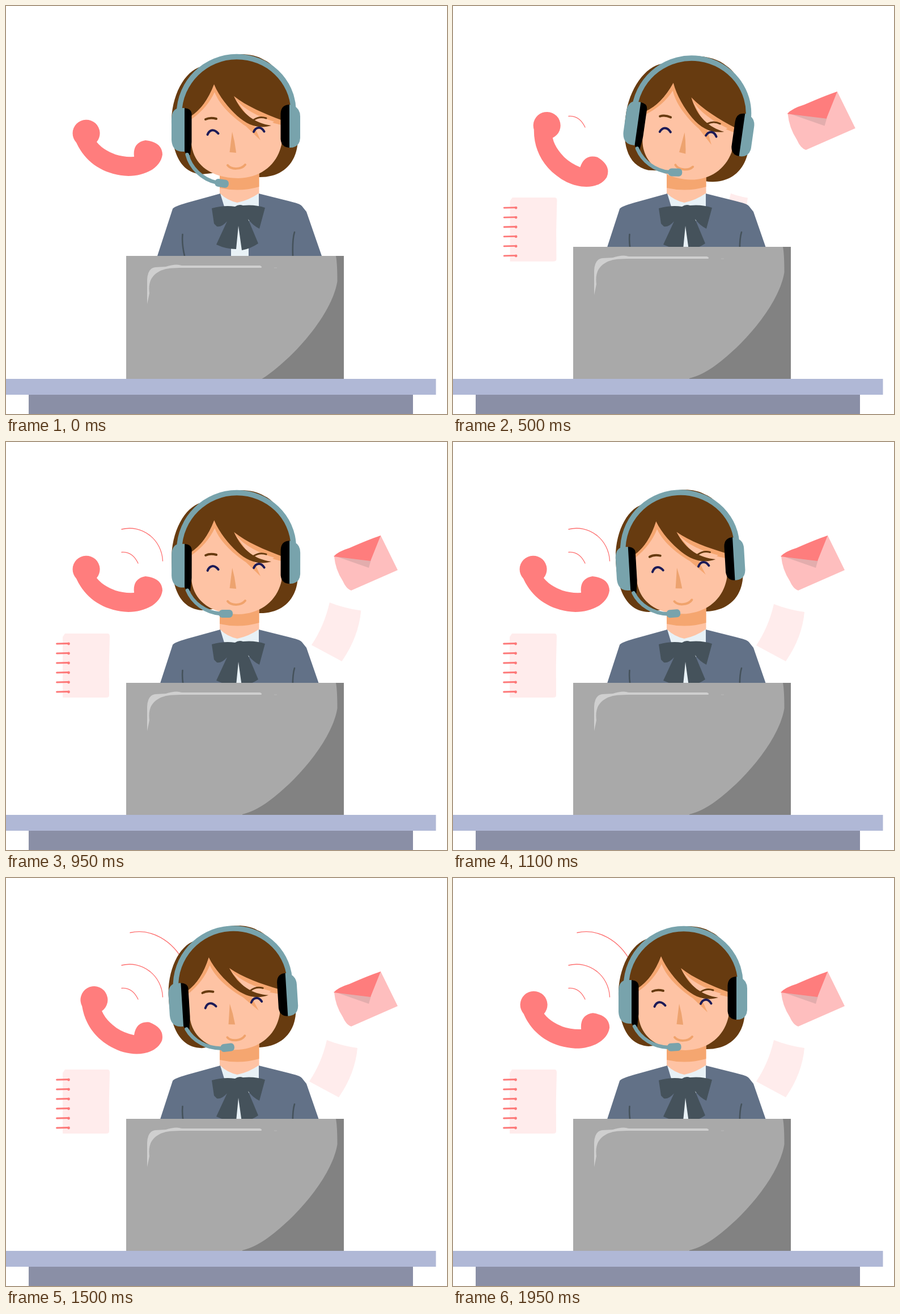
Write an HTML page that moves like this. It is 778 by 720 pixels and loops after 2 s.

```html
<!DOCTYPE html>
<html lang="en">
<head>
<meta charset="utf-8">
<title>Help desk</title>
<style>
html, body { margin: 0; width: 100%; height: 100%; overflow: hidden; background: #fff; }
svg { display: block; width: 100vw; height: 100vh; }
.line { fill: none; stroke-linecap: round; stroke-linejoin: round; }
</style>
</head>
<body>
<svg viewBox="0 0 778 720">
  <g class="line" stroke="#fd7070" stroke-width="1.3">
    <path id="wave1" d="M204 194.500Q223 193 233 214"/>
    <path id="wave2" d="M204 154C240 145 275 172 276.500 210"/>
    <path id="wave3" d="M219 96.500C255 88 294 110 314 149"/>
  </g>

  <path id="phone" fill="#ff7d7d" d="M124 241A24 24 0 1 1 160 240Q171 254 193 262Q208 267 226 266Q223 241 246 237Q275 240 276 262C273 286 245 300 216 300C172 298 140 276 124 241Z"/>

  <g id="notebook">
    <path fill="#ffecec" d="M104 338H179Q183 338 183 343Q181 395 182 447Q182 451 177 451H100V344Z"/>
    <g id="rings" class="line" stroke="#fd7878" stroke-width="2.800"></g>
  </g>

  <path id="sheet" fill="#ffecec" d="M566 286Q592 296 620 300Q616 345 587 387L535 359Q557 326 566 286Z"/>

  <g id="envelope">
    <path fill="#febebe" d="M579 202L661 165L691 226L609 262Q600 259 594 245Q581 225 579 202Z"/>
    <path fill="#e3adad" d="M580 201L644 208L640 222Z"/>
    <path fill="#fe7d7d" d="M578 202Q586 193 606 187Q640 172 661 165L643 210Z"/>
  </g>

  <path id="backHair" fill="#673b10" d="M345 297C308 294 291 260 292 200C294 150 320 109 350 106C380 82 430 79 455 95C488 110 508 165 515 235C514 280 485 303 446 302L373 294Z"/>

  <path fill="#fec3a4" d="M377 290H446.500V350H377Z"/>
  <path fill="#f5a670" d="M377 290H446.500V319Q412 329 377 321Z"/>
  <path fill="#627187" d="M267 441L294 358Q296 354 320 347L378 331L410 368L446 331L498 344Q519 349 522 353L530 363L557 441V460H267Z"/>
  <path fill="#e8f1f6" d="M378 331Q390 343 408 347Q428 343 446 330.500V356L428 380V441H397V400L385 354Z"/>
  <path fill="#45525b" d="M363 357Q385 351 404 354Q411 349 418 352Q440 350 457 356L447 393Q435 387 427 376L445 419Q432 428 416 431L410 388L406 429Q388 429 371 421L390 380Q380 391 372 389L367 384Z"/>
  <path class="line" stroke="#45525b" stroke-width="2.600" d="M311.500 403Q310 420 315 441M509 399Q505 412 506 441"/>

  <g id="head">
    <path fill="#fec3a4" d="M367 138Q350 180 327 195V240C328 270 350 303 410 304C450 303 478 280 486 245L487 200L402 158Z"/>
    <path fill="#f5a670" d="M367 138Q352 178 327 193V200Q355 180 368 152C378 178 405 200 423 212L449 237Q442 222 438 211L402 160Q430 198 486 210V198L440 180Z"/>
    <path fill="#fec3a4" d="M404 165Q430 191 473 204L467 208L440 203Z"/>
    <path fill="#673b10" d="M324 196Q352 178 367 138C376 160 393 180 408 194C428 212 448 217 468 211C440 207 417 192 402 159C425 177 455 190 488 202L502 170C492 118 455 93 409 92C355 92 314 130 312 190Z"/>
    <g class="line" stroke-width="4">
      <path stroke="#1c1b57" d="M355.500 227C359 218 367 216 374.500 225M437 222C441 213 450 212 455.500 221.500"/>
      <path stroke="#673b10" d="M352 200Q360 196 371 199"/>
      <path stroke="#673b10" stroke-width="3" d="M437 201Q447 194 459 198"/>
      <path stroke="#f0a36c" d="M391 281C397 289 415 289 422 280"/>
    </g>
    <path fill="#eda36f" d="M399 222L394.500 258L406 259Q404 240 399 222Z"/>
    <path d="M314 180Q328 181 327.500 192V240L325 263Q315 264 314 250ZM501 174Q485 174 484.500 190V235Q486 250 501 250Z"/>
    <g id="mic" fill="#78a3ac">
      <path class="line" stroke="#78a3ac" stroke-width="6.500" style="fill:none" d="M320 262C329 284 352 301 378 303"/>
      <rect x="375.500" y="296" width="24.500" height="14" rx="6"/>
    </g>
    <path class="line" stroke="#78a3ac" stroke-width="9.500" d="M305.500 190C306 134 352 89.500 407 89.500C462 89.500 506 132 507 184"/>
    <path fill="#78a3ac" d="M315 180H304Q292 183 292 200V236Q293 257 312 257H315ZM500 174Q519 177 519 195V233Q518 250 500 250Z"/>
  </g>

  <g id="laptop">
    <path fill="#a9a9a9" d="M212 425H596V670H212Z"/>
    <path fill="#828282" d="M582 425Q584.500 438 584.500 470C577 517 531 576 490 612C458 641 437 652 417 657V670H596V425Z"/>
    <path fill="#cfcfcf" d="M249 510V467Q250 446 264 445L282 444Q300 438 310 442H448Q453 444 450 446H306Q282 446 271 452C254 461 251 475 253 491Z"/>
    <path fill="#b8b8b8" d="M473 445.500H478V446.500H473Z"/>
  </g>

  <path fill="#b0b8d6" d="M0 658H758.500V686H0Z"/>
  <path fill="#8a8fa6" d="M40 686H718V720H40Z"/>
</svg>
<script>
const LOOP = 2000, STEP = 50;
const $ = id => document.getElementById(id);

const linear = u => u;
const easeOut = u => Math.sin(u * Math.PI / 2);
const easeInOut = u => (1 - Math.cos(u * Math.PI)) / 2;

// Each key is [time, value, easing used to reach it].
function track(keys) {
  return t => {
    if (t <= keys[0][0]) return keys[0][1];
    for (let i = 1; i < keys.length; i++) {
      const [t0, v0] = keys[i - 1], [t1, v1, ease = linear] = keys[i];
      if (t <= t1) return v0 + (v1 - v0) * ease((t - t0) / (t1 - t0));
    }
    return keys[keys.length - 1][1];
  };
}

const headTurn = track([[0, 0], [420, 8.1, easeOut], [500, 8.1], [1300, -5.3, easeInOut], [1900, 0]]);
const micTurn = track([[0, 8.5], [200, -4.6, easeOut], [500, -7.1], [950, 0, easeInOut], [1300, -1.3], [1500, -3.3], [1950, -3.7]]);
const phoneTurn = track([[0, 0], [350, 25.3, easeOut], [500, 25.3], [920, 0, easeInOut], [1300, 0], [1650, 25, easeInOut], [2000, 0, easeInOut]]);
const laptopDrop = track([[0, 16], [450, 0, easeOut]]);
const pop = track([[0, 0], [440, 1.085, easeOut], [680, 1]]);

const popStart = { envelope: 0, notebook: 173, sheet: 350 };
const waveStart = { wave1: 100, wave2: 750, wave3: 1400 };

const place = (id, transform) => $(id).setAttribute('transform', transform);
const turn = (id, angle, x, y) => place(id, `rotate(${angle} ${x} ${y})`);

for (let i = 0; i < 6; i++) {
  const y = 356 + i * 17;
  $('rings').innerHTML += `<path d="M89.500 ${y}L110 ${y - 0.5}"/><circle cx="110.500" cy="${y}" r="1"/>`;
}

function draw(t) {
  turn('backHair', headTurn(t), 396, 290);
  turn('head', headTurn(t), 396, 290);
  turn('mic', micTurn(t), 318, 260);
  turn('phone', phoneTurn(t), 184.2, 271.5);
  place('laptop', `translate(0 ${laptopDrop(t)})`);
  for (const id in popStart)
    place(id, `translate(396 386) scale(${pop(t - popStart[id])}) translate(-396 -386)`);
  for (const id in waveStart)
    $(id).style.display = t >= waveStart[id] ? '' : 'none';
}

const start = performance.now();
function tick() {
  const t = (performance.now() - start) % LOOP;
  draw(Math.floor(t / STEP) * STEP);
  requestAnimationFrame(tick);
}
tick();
</script>
</body>
</html>
```
